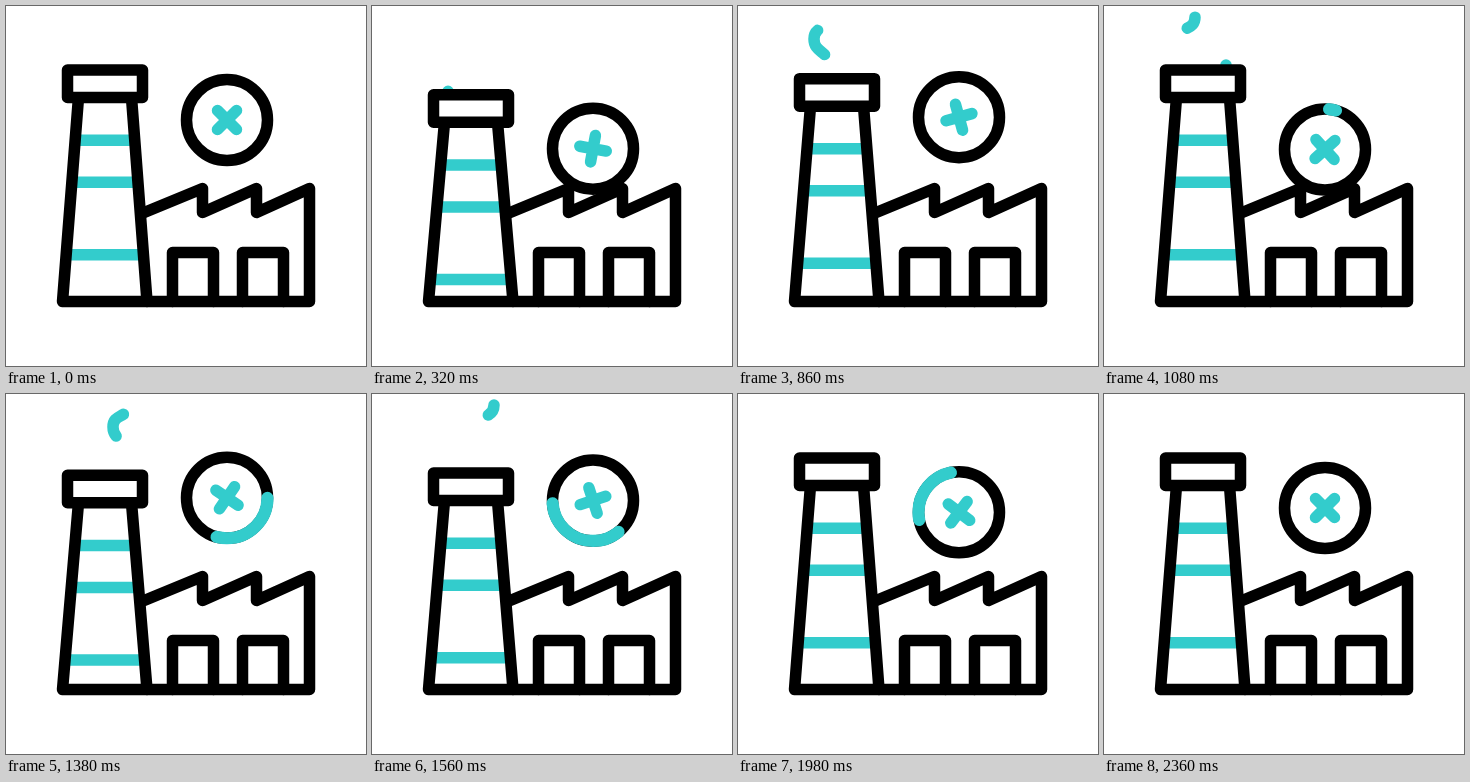
Animation of 360 by 360 pixels, one loop 2400 ms. Source, as an HTML page:

```html
<!DOCTYPE html>
<html lang="en">
<head>
<meta charset="utf-8">
<title>Factory</title>
<style>
  html, body { margin: 0; width: 100%; height: 100%; overflow: hidden; background: #fff; }
  svg { display: block; width: 100%; height: 100%; }
  path, circle, rect { stroke-width: 11.5; stroke-linecap: round; stroke-linejoin: round; }
  .ink { fill: none; stroke: #000; }
  .solid { fill: #fff; }
  .teal { fill: none; stroke: #33cccc; }
  #stripes { stroke-linecap: butt; }
  #arc { stroke-width: 12.2; }
</style>
</head>
<body>
<svg viewBox="0 0 360 360">
  <defs>
    <path id="door" d="M166.500 295.500V246.500H207.500V295.500"/>
  </defs>

  <path id="smokeA" class="teal" pathLength="100"
    d="M76 85.500c0-14 15-11 15-26.500c0-14-15-12-15-26c0-14 15-8 15-22"/>
  <path id="smokeB" class="teal" pathLength="100" transform="translate(31)"
    d="M76 85.500c0-14 15-11 15-26.500c0-14-15-12-15-26c0-14 15-8 15-22"/>

  <path class="ink" d="M137 207L196.500 182.500V206.500L250.500 182.500V206.500L303.500 182.500V295.500H141"/>
  <use href="#door" class="ink"/>
  <use href="#door" class="ink" x="70"/>

  <path id="stripes" class="teal"/>
  <path id="stack" class="ink"/>
  <rect id="cap" class="ink solid" x="61.500" y="64" width="75" height="27.500"/>

  <g id="badge">
    <circle class="ink" r="40.500"/>
    <circle id="arc" class="teal" r="40.500" pathLength="100" transform="rotate(-90)"/>
    <path id="cross" class="teal" d="M-9.500 -9.500L9.500 9.500M9.500 -9.500L-9.500 9.500"/>
  </g>
</svg>
<script>
const LOOP = 2400, BEAT = 360;
const el = id => document.getElementById(id);
const [smokeA, smokeB, stripes, stack, cap, badge, arc, cross] =
  ['smokeA', 'smokeB', 'stripes', 'stack', 'cap', 'badge', 'arc', 'cross'].map(el);

// badge height at each beat
const bounce = [0, 29.5, -19, 29.5, -13, 8.5, 0, 0];

const span = (t, from, to) => Math.min(1, Math.max(0, (t - from) / (to - from)));
const ease = u => (1 - Math.cos(Math.PI * u)) / 2;
const easeOut = u => Math.sin(Math.PI / 2 * u);
const bump = (t, from, peak, to) => ease(span(t, from, peak)) - ease(span(t, peak, to));

function bounceAt(t) {
  const i = Math.floor(t / BEAT);
  return bounce[i] + (bounce[i + 1] - bounce[i]) * ease(t / BEAT - i);
}

// show the part of a path between two fractions
function trim(path, from, to) {
  path.style.visibility = to > 0 && from < 1 ? 'visible' : 'hidden';
  path.setAttribute('stroke-dasharray', `${Math.max(0.1, 100 * (to - from))} 300`);
  path.setAttribute('stroke-dashoffset', -100 * from);
}

function puff(path, t, start) {
  const tail = start + 145;
  trim(path, ease(span(t, tail, tail + 860)), ease(span(t, start, start + 800)));
}

function drawStack(dy) {
  const top = 91.5 + dy;
  cap.setAttribute('y', 64 + dy);
  stack.setAttribute('d', `M72.5 ${top}L56.5 295.500H141L125.5 ${top}`);
  stripes.setAttribute('d', [134.2, 176.2, 248.7].map(y => {
    const k = (y - 91.5) / 204;
    return `M${72.5 - 16 * k} ${y + dy}H${125.5 + 15.5 * k}`;
  }).join(''));
}

function draw(now) {
  const t = now % LOOP;
  drawStack(30.5 * bump(t, 0, 450, 1090) + 18.5 * bump(t, 1080, 1440, 1860));

  const turn = 90 * easeOut(span(t, 0, 760)) + 270 * easeOut(span(t, 760, 2200));
  badge.setAttribute('transform', `translate(221 ${114 + bounceAt(t)})`);
  cross.setAttribute('transform', `rotate(${turn})`);

  const lap = span(t, 1060, 2340);
  trim(arc, lap, 1 - (1 - lap) ** 2.7);

  puff(smokeA, t, 300);
  puff(smokeB, t, 760);
}

const begin = performance.now();
function tick() {
  draw(performance.now() - begin);
  requestAnimationFrame(tick);
}
draw(0);
requestAnimationFrame(tick);
</script>
</body>
</html>
```
